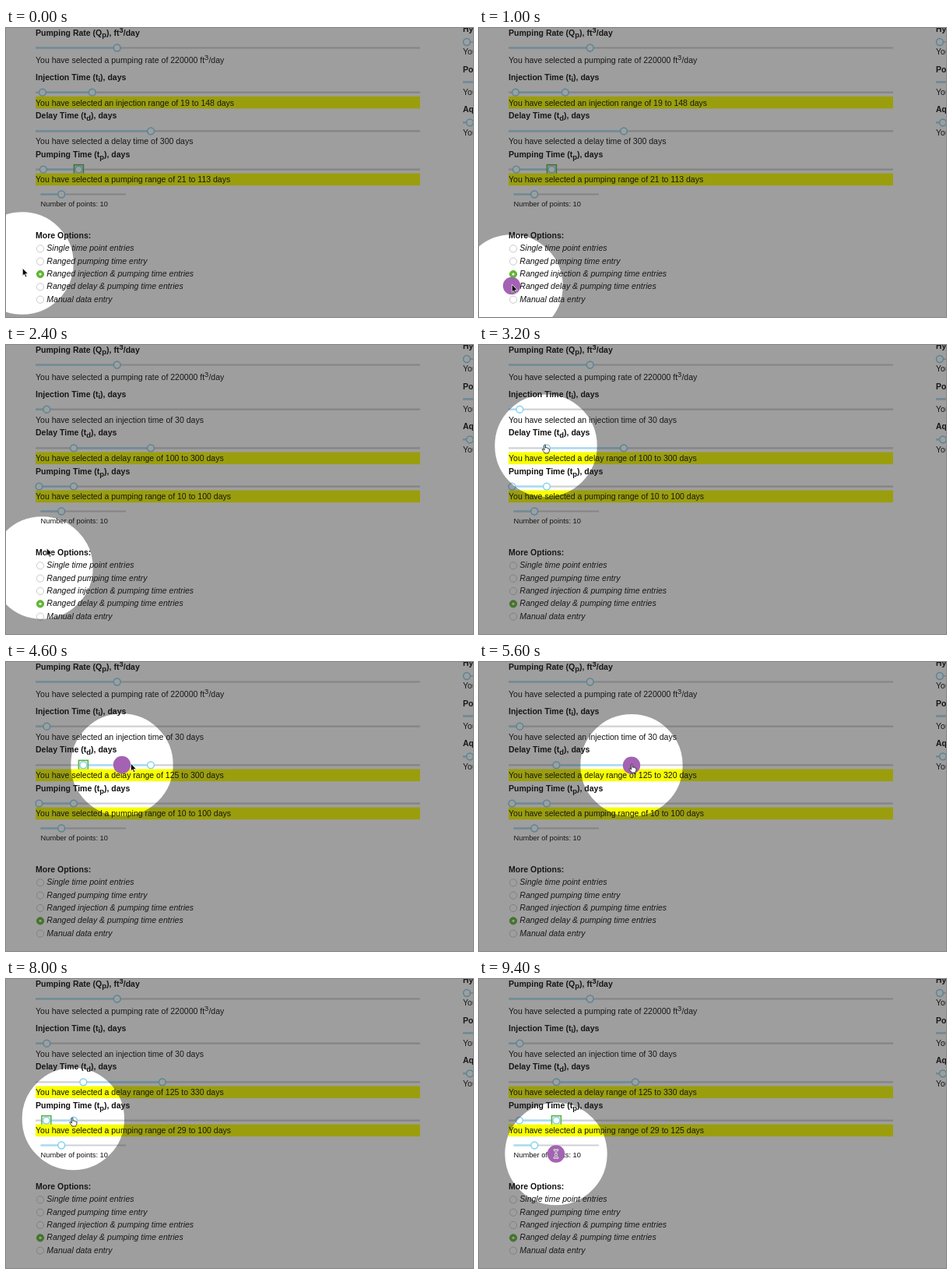
Recreate the animation shown at these times as an HTML page. Size 600x371 px, loop 9600 ms.

```html
<!DOCTYPE html>
<html lang="en">
<head>
<meta charset="utf-8">
<title>Slider walkthrough</title>
<style>
  html, body { margin: 0; width: 100%; height: 100%; overflow: hidden; background: #fff; }
  svg { display: block; width: 600px; height: 371px; }
  text { font: 10.53px "Liberation Sans", Arial, sans-serif; fill: #111; white-space: pre; }
  .label { font-weight: bold; }
  .option { font-style: italic; }
  .small { font-size: 9.32px; }
  .script { font-size: 90%; }
  .track { stroke: #d0d1d5; stroke-width: 2.2; }
  .fill { stroke: #a5def5; stroke-width: 2.2; }
  .thumb { fill: #fff; stroke: #83d2f2; stroke-width: 1.5; }
  .focus { fill: #e2f2d8; stroke: #58b044; stroke-width: 1.5; }
  .bar { fill: #f8ff00; }
  .radio { fill: #fff; stroke: #c4c4c4; stroke-width: .9; }
  .picked { fill: #62b934; stroke: #57a62e; }
  #shade { fill: none; stroke: #1f1e1e; stroke-opacity: .43; stroke-width: 1600; }
  #dot { fill: #a462b3; }
  #pointer path { stroke-linejoin: round; stroke-linecap: round; }
</style>
</head>
<body>
<svg viewBox="0 0 600 371">
  <g id="page"></g>
  <g id="halo">
    <circle id="shade" r="865.7"/>
    <circle id="dot" r="11.2"/>
  </g>
  <g id="pointer">
    <path id="arrow" transform="translate(.3 -1.5)" d="M0 0V9.6L2.2 7.5 3.8 11.2 5.4 10.5 3.8 6.9H6.8Z" fill="#000" stroke="#fff" stroke-width=".7"/>
    <path id="hand" transform="translate(-1.3 -1) scale(.9)" d="M-1 0C-1-1 1-1 1 0V4C1 3 3 3 3 4.3 3.3 3.5 5 3.7 5 5 5.5 4.5 6.4 5 6.4 6V8C6.4 10 5 10 5 11.5H-.3C-.5 10-3.5 7.5-3.7 6.2-3.5 5-2 5.4-1 6.8Z" fill="#fff" stroke="#111" stroke-width=".9"/>
    <g id="beam" fill="none">
      <path d="M-2.2-5Q0-5 0-3.5 0-5 2.2-5M0-3.5V3.5M-2.2 5Q0 5 0 3.5 0 5 2.2 5M-1 1H1" stroke="#fff" stroke-width="2.4"/>
      <path d="M-2.2-5Q0-5 0-3.5 0-5 2.2-5M0-3.5V3.5M-2.2 5Q0 5 0 3.5 0 5 2.2 5M-1 1H1" stroke="#444" stroke-width=".7"/>
    </g>
  </g>
</svg>
<script>
const LOOP = 9600, STEP = 200, LEAD = 60, SWITCH = 1200;
const $ = id => document.getElementById(id);

// Halo path: time, x, y
const path = [
  [0, 21, 302], [200, 21, 329], [600, 42, 331], [2200, 42, 331],
  [2400, 46, 286], [2800, 86, 130], [3200, 86, 129.3], [3800, 85, 132],
  [4200, 99, 132], [4400, 108, 132], [4600, 149, 132], [4800, 186, 132],
  [5200, 186, 132], [5800, 201, 133], [6000, 204, 134], [6400, 66.5, 174.5],
  [6800, 43, 182], [7400, 52, 182], [7800, 86, 179.5], [8400, 87, 180],
  [8800, 99, 182], [9200, 99, 211], [9400, 99, 224.5]
];
const presses = [[800, 1200], [3800, 4800], [5200, 6000], [6800, 7400], [8400, LOOP]];
const hands = [[2800, 4600], [4800, 6200], [6600, 9000]];

const within = (t, spans) => spans.some(([a, b]) => t >= a && t < b);
const ramp = (t, t0, t1, a, b) =>
  Math.round(a + (b - a) * Math.min(1, Math.max(0, (t - t0) / (t1 - t0))));

function place(t) {
  const i = path.findIndex(p => p[0] > t);
  if (i < 0) return path[path.length - 1].slice(1);
  const [t0, x0, y0] = path[i - 1], [t1, x1, y1] = path[i];
  const k = (t - t0) / (t1 - t0);
  return [x0 + (x1 - x0) * k, y0 + (y1 - y0) * k];
}

const text = (x, y, s, cls = '') => `<text x="${x}" y="${y}" class="${cls}">${s}</text>`;
const shift = (s, dy) =>
  `<tspan class="script" dy="${dy}">${s}</tspan><tspan dy="${-dy}">&#8203;`;
const sub = s => shift(s, 2.6);
const sup = s => shift(s, -3.9);
const end = '</tspan>';
const line = (x0, x1, y, cls) => `<path class="${cls}" d="M${x0} ${y}H${x1}"/>`;
const thumb = (x, y) => `<circle class="thumb" cx="${x}" cy="${y}" r="4.4"/>`;
const dayX = d => 37.5 + .495 * d;

function slider(x0, x1, y, thumbs, focus = -1) {
  const from = thumbs.length > 1 ? thumbs[0] : x0;
  let out = line(x0, x1, y, 'track') + line(from, thumbs[thumbs.length - 1], y, 'fill');
  thumbs.forEach((x, i) => {
    if (i === focus) out += `<rect class="focus" x="${x - 6}" y="${y - 6}" width="12" height="12"/>`;
    out += thumb(x, y);
  });
  return out;
}

// A day slider with one value, or a highlighted range with two
function field(name, key, verb, labelY, y, textY, days, focus) {
  const range = days.length > 1;
  return text(38, labelY, `${name} Time (t${sub(key)}), days${end}`, 'label') +
    slider(38, 532, y, days.map(dayX), focus) +
    (range ? `<rect class="bar" x="38" y="${textY - 11.8}" width="494" height="15.6"/>` : '') +
    text(38, textY, `You have selected ${verb} ${range ? 'range' : 'time'} of ${days.join(' to ')} days`);
}

const fixed =
  text(38, 9.7, `Pumping Rate (Q${sub('p')}), ft${end}${sup('3')}/day${end}`, 'label') +
  slider(38, 532, 25.5, [142.7]) +
  text(38, 44.8, `You have selected a pumping rate of 220000 ft${sup('3')}/day${end}`) +
  slider(44.5, 154, 213.5, [71.2]) +
  text(44.5, 228.9, 'Number of points: 10', 'small') +
  text(38, 270.2, 'More Options:', 'label') +
  text(587, 4.8, 'Hydraulic', 'label') + slider(587, 640, 18, [592]) + text(587, 34.3, 'You have') +
  text(587, 56.8, 'Porosity', 'label') + slider(587, 640, 69.3, [630]) + text(587, 86.2, 'You have') +
  text(587, 108.3, 'Aquifer', 'label') + slider(587, 640, 121.3, [596]) + text(587, 137.8, 'You have');

const options = [
  'Single time point entries', 'Ranged pumping time entry',
  'Ranged injection &amp; pumping time entries',
  'Ranged delay &amp; pumping time entries', 'Manual data entry'
];

function radios(picked) {
  return options.map((s, i) => {
    const y = 283.3 + i * 16.35, on = i === picked;
    return `<circle class="radio ${on ? 'picked' : ''}" cx="44" cy="${y}" r="4.6"/>` +
      (on ? `<circle cx="44" cy="${y}" r="1.5" fill="#fff"/>` : '') +
      text(52.3, y + 2.9, s, 'option');
  }).join('');
}

function page(t) {
  const before = t < SWITCH;
  const injection = before ? [19, 148] : [30];
  const delay = before ? [300] : [ramp(t, 3800, 4200, 100, 125), ramp(t, 5200, 5800, 300, 330)];
  const pumping = before ? [21, 113] : [ramp(t, 6800, 7200, 10, 29), ramp(t, 8400, 8800, 100, 125)];
  const delayFocus = within(t, [[3800, 5200]]) ? 0 : within(t, [[5200, 6800]]) ? 1 : -1;
  const pumpFocus = within(t, [[6800, 8400]]) ? 0 : before || t >= 8400 ? 1 : -1;
  return fixed + radios(before ? 2 : 3) +
    field('Injection', 'i', 'an injection', 66.6, 82.7, 99.6, injection) +
    field('Delay', 'd', 'a delay', 116.3, 132.3, 149.3, delay, delayFocus) +
    field('Pumping', 'p', 'a pumping', 165.9, 181.6, 198.4, pumping, pumpFocus);
}

const show = (id, on) => $(id).setAttribute('visibility', on ? 'visible' : 'hidden');
const move = (id, [x, y]) => $(id).setAttribute('transform', `translate(${x} ${y})`);

function draw(t) {
  $('page').innerHTML = page(t);
  const hand = within(t, hands), beam = t >= 9000;
  move('halo', place(t));
  move('pointer', place(t + LEAD));
  show('dot', within(t, presses));
  show('hand', hand);
  show('beam', beam);
  show('arrow', !hand && !beam);
}

let last = -1;
function tick() {
  const t = Math.floor(performance.now() % LOOP / STEP) * STEP;
  if (t !== last) draw(last = t);
  requestAnimationFrame(tick);
}
tick();
</script>
</body>
</html>
```
